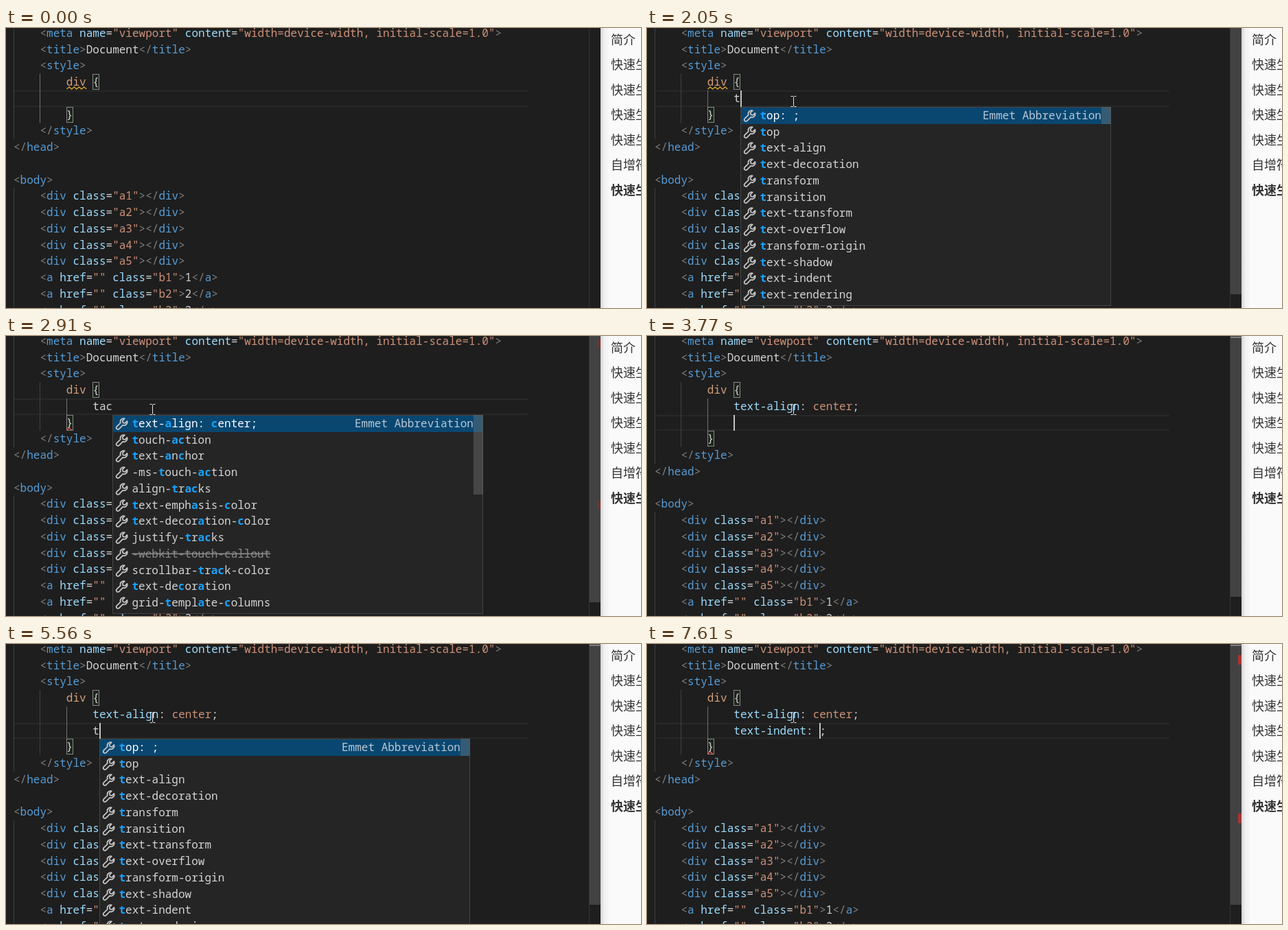
Write an HTML page that moves like this. It is 925 px wide and 408 px high and loops after 8000 ms.

```html
<!DOCTYPE html>
<html lang="en">
<head>
<meta charset="utf-8">
<title>Editor typing</title>
<style>
  html, body { margin: 0; width: 100%; height: 100%; overflow: hidden; background: #1e1e1e; }
  svg { display: block; width: 100%; height: 100%; }
  text { white-space: pre; }
  .code text { font: 16.035px "Noto Sans Mono", monospace; }
  .code .list text { font-weight: 500; }
  .page text { font: 18px "Noto Sans CJK SC", "Noto Sans CJK", sans-serif; fill: #333; }
  .page .current { font-weight: 700; }
  .hit { font-weight: 700; fill: #18a3ff; }
  .old { fill: #8c8c8c; text-decoration: line-through; }
  .slider { fill: #797979; fill-opacity: .4; }
</style>
</head>
<body>
<svg viewBox="0 0 925 408" preserveAspectRatio="none">
  <defs>
    <linearGradient id="edge">
      <stop offset="0" stop-color="#d2d2d2"/>
      <stop offset=".35" stop-color="#efefef"/>
      <stop offset="1" stop-color="#fafafa"/>
    </linearGradient>
    <path id="wrench" d="M14.5 4.5 11.9 7.1 9.5 6.5 8.9 4.1 11.5 1.5A4 4 0 0 0 6.5 6.7L1.8 11.4A2 2 0 0 0 4.6 14.2L9.3 9.5A4 4 0 0 0 14.5 4.5Z"
      fill="none" stroke="#c5c5c5" stroke-width="1.45" stroke-linejoin="round"/>
  </defs>
  <rect width="925" height="408" fill="#1e1e1e"/>
  <g class="code" id="scene"></g>
  <g class="page" id="page">
    <rect x="866" width="59" height="408" fill="#fafafa"/>
    <rect x="866" width="14" height="408" fill="url(#edge)"/>
  </g>
  <path id="pointer" d="M-4-8h3l1 1 1-1h3M0-7V6M-4 7h3l1-1 1 1h3" fill="none" stroke="#e4e4e4"/>
</svg>
<script>
const LOOP = 8000, CHAR = 9.62, LINE = 23.75;
const scene = document.getElementById('scene');
const pointer = document.getElementById('pointer');
const svg = document.querySelector('svg');

const C = { punct: '#808080', tag: '#569cd6', attr: '#9cdcfe', string: '#ce9178', plain: '#d4d4d4', selector: '#d49f7a' };
const colX = col => 11 + col * CHAR;
const pixelX = col => Math.round(colX(col));
const rowY = row => Math.round(-4.1 + row * LINE);

const head = [
  '    <meta name="viewport" content="width=device-width, initial-scale=1.0">',
  '    <title>Document</title>',
  '    <style>'
];
const tail = ['    </style>', '</head>', '', '<body>'];
for (let i = 1; i <= 5; i++) tail.push(`    <div class="a${i}"></div>`);
for (let i = 1; i <= 3; i++) tail.push(`    <a href="" class="b${i}">${i}</a>`);

// Matched letters stand between bars; a leading ~ marks a deprecated entry.
const lists = {
  t: { bar: 25, items: ['|t|op: ;', '|t|op', '|t|ext-align', '|t|ext-decoration', '|t|ransform', '|t|ransition',
    '|t|ext-transform', '|t|ext-overflow', '|t|ransform-origin', '|t|ext-shadow', '|t|ext-indent', '|t|ext-rendering'] },
  ta: { bar: 40, items: ['|t|ext-|a|lign: left;', '|ta|b-size', '|ta|ble-layout', '|t|ext-|a|lign', '|t|ext-|a|lign-last',
    '|t|ext-|a|nchor', '|t|ouch-|a|ction', '|t|r|a|nsform', '|t|r|a|nsition', '|t|r|a|nsform-origin',
    '|t|r|a|nsform-style', '|t|r|a|nsition-delay'] },
  tac: { bar: 116, items: ['|t|ext-|a|lign: |c|enter;', '|t|ouch-|ac|tion', '|t|ext-|a|n|c|hor', '-ms-|t|ouch-|ac|tion',
    'align-|t|r|ac|ks', '|t|ext-emph|a|sis-|c|olor', '|t|ext-decor|a|tion-|c|olor', 'justify-|t|r|ac|ks',
    '~-webkit-touch-callout', 'scrollbar-|t|r|ac|k-color', '|t|ext-de|c|or|a|tion', 'grid-|t|empl|a|te-|c|olumns'] },
  ti: { bar: 25, items: ['|t|ext-|i|ndent: ;', '|t|ext-|i|ndent', '|t|rans|i|tion', '|t|rans|i|tion-delay',
    '|t|rans|i|tion-duration', '|t|rans|i|tion-property', '|t|rans|i|tion-timing-function', '|t|ransform-or|i|gin',
    '|t|ext-al|i|gn', '|t|ext-decorat|i|on', '|t|ext-render|i|ng', '|t|ext-al|i|gn-last'] }
};

const align = 'text-align: center;';
const steps = [
  [0, { css: [''], caret: 0, back: 0, list: '', empty: 1, error: 0 }],
  [660, { caret: 1 }], [1190, { caret: 0 }], [1720, { caret: 1 }],
  [1920, { css: ['t'] }],
  [2050, { list: 't' }],
  [2110, { css: ['ta'] }],
  [2240, { list: 'ta' }],
  [2440, { css: ['tac'], list: 'tac' }],
  [2910, { caret: 0, empty: 0, error: 1 }],
  [3110, { css: [align], caret: 1, list: '' }],
  [3570, { caret: 0, error: 0 }],
  [3770, { css: [align, ''], caret: 1 }],
  [4310, { caret: 0 }], [4770, { caret: 1 }], [5300, { caret: 0 }],
  [5430, { css: [align, 't'], caret: 1 }],
  [5560, { list: 't' }],
  [5830, { css: [align, 'ti'], list: 'ti' }],
  [6300, { caret: 0 }], [6360, { error: 1 }], [6820, { caret: 1 }], [7340, { caret: 0 }],
  [7540, { css: [align, 'text-indent: ;'], back: 1, list: '' }],
  [7610, { caret: 1 }]
];

const esc = s => s.replace(/&/g, '&amp;').replace(/</g, '&lt;');
const rect = (x, y, w, h, fill, extra = '') => `<rect x="${x}" y="${y}" width="${w}" height="${h}" fill="${fill}" ${extra}/>`;
const text = (x, y, body, fill = C.plain) => `<text x="${x}" y="${y}" fill="${fill}">${body}</text>`;
const span = (s, fill) => `<tspan fill="${fill}">${esc(s)}</tspan>`;
const guide = (col, from, to, fill = '#404040') => rect(pixelX(col), rowY(from), 1, rowY(to) - rowY(from), fill);

function markup(line) {
  const token = /(<\/?|>)|((?<=<\/?)\w+)|(\w+(?=="))|("[^"]*")|(\w+|[^<>"\w]+)/g;
  const fills = [C.punct, C.tag, C.attr, C.string, C.plain];
  return [...line.matchAll(token)]
    .map(m => span(m[0], fills[m.slice(1).findIndex(g => g !== undefined)])).join('');
}

function declaration(line) {
  const m = line.match(/^([\w-]+)(: )(\w*)(;)$/);
  const fills = [C.attr, C.plain, C.string, C.plain];
  return m ? m.slice(1).map((s, i) => span(s, fills[i])).join('') : span(line, C.plain);
}

function squiggle(x, y, width, stroke) {
  let d = `M${x} ${y + 3}`;
  for (let i = 1; i * 3.6 <= width; i++) d += `L${x + i * 3.6} ${y + (i % 2 ? 0 : 3)}`;
  return `<path d="${d}" fill="none" stroke="${stroke}" stroke-width="1.4"/>`;
}

function bracketBox(col, row) {
  return rect(pixelX(col) + .5, rowY(row) + .5, 9, 22, '#1c251c', 'stroke="#888"');
}

function popup({ items, bar }, x, y) {
  const w = 539, h = 289;
  let out = rect(x, y + .5, w, h, '#252526', 'stroke="#454545"') + rect(x + .5, y + 1, w - 1, 24, '#094771');
  items.forEach((item, i) => {
    const top = Math.round(y + .9 + i * LINE), old = item[0] === '~';
    const label = old ? `<tspan class="old">${item.slice(1)}</tspan>`
      : item.split('|').map((s, k) => k % 2 ? `<tspan class="hit">${s}</tspan>` : s).join('');
    out += `<use href="#wrench" transform="translate(${x + 3.5} ${top + 2.5}) scale(1.2)"/>`
      + text(x + 28, top + 17, label, i ? C.plain : '#fff');
  });
  out += text(x + 352.5, y + 18, 'Emmet Abbreviation', '#b9c8d5')
    + `<rect class="slider" x="${x + w - 13.5}" y="${y}" width="14" height="${bar}" style="opacity:var(--list-bar)"/>`;
  return `<g class="list">${out}</g>`;
}

function draw({ css, caret, back, list, empty, error }) {
  const row = 3 + css.length, close = row + 1;
  const line = css[css.length - 1];
  const x = pixelX(12 + line.length - back), grown = css.length > 1;
  let out = '';

  out += rect(11, rowY(row), 750, 2, '#282828') + rect(11, rowY(row + 1) - 2, 750, 2, '#282828');
  out += guide(0, 0, close + 2) + guide(0, close + 5, 20);
  out += guide(4, 3, close + 1, css[0] ? '#404040' : '#707070');
  if (css[0]) out += guide(8, 4, close, '#707070');
  out += bracketBox(12, 3) + bracketBox(8, close);

  const lines = [
    ...head.map(markup),
    span('        div', C.selector) + span(' {', C.plain),
    ...css.map(s => ' '.repeat(12) + declaration(s)),
    span('        }', C.plain),
    ...tail.map(markup)
  ];
  lines.forEach((body, i) => { out += text(colX(0), rowY(i) + 17, body); });

  if (empty) out += squiggle(colX(8) + .5, rowY(3) + 19, 29, '#d8a032');
  if (error) out += squiggle(colX(8) + .5, rowY(close) + 19, 9, '#f14c4c');
  if (caret) out += rect(x, rowY(row), 2, rowY(row + 1) - rowY(row), '#c4c4c2');

  out += rect(849, 0, 1, 408, '#363636');
  out += `<rect class="slider" x="850" width="16" height="${grown ? 380 : 388}" style="opacity:var(--bar)"/>`;
  if (grown) out += rect(850, 1, 16, 2, '#7c7c7c');
  if (error) {
    const fill = grown ? '#a83434' : '#6b3535';
    out += rect(861, grown ? 16 : 4, 5, 14, fill) + rect(861, grown ? 247 : 239, 5, 14, fill);
  }
  if (list) out += popup(lists[list], x + .5, rowY(row + 1));
  scene.innerHTML = out;
}

const ramp = (t, a, b) => Math.min(1, Math.max(0, (t - a) / (b - a)));

function movePointer(t) {
  const p = ramp(Math.floor((t - 70) / 65), 0, 12);
  const e = p * p * (3 - 2 * p);
  const [x, y] = t < 920 ? [860 - 650 * e, 380 - 277 * e] : [213, 107];
  pointer.setAttribute('transform', `translate(${Math.round(x) + .5} ${Math.round(y) + .5})`);
  pointer.setAttribute('visibility', t < 70 ? 'hidden' : 'visible');
}

['简介', '快速生成', '快速生成', '快速生成', '快速生成', '自增符号', '快速生成'].forEach((title, i, all) => {
  const current = i === all.length - 1 ? 'class="current"' : '';
  document.getElementById('page').innerHTML += `<text x="881" y="${23.5 + i * 36.5}" ${current}>${title}</text>`;
});

const start = performance.now();
let shown = -1;

function frame() {
  const t = (performance.now() - start) % LOOP;
  const count = steps.filter(([at]) => at <= t).length;
  if (count !== shown) {
    shown = count;
    draw(Object.assign({}, ...steps.slice(0, count).map(s => s[1])));
  }
  svg.style.setProperty('--bar', ramp(t, 70, 200));
  svg.style.setProperty('--list-bar', 1 - ramp(t, 6640, 6820));
  movePointer(t);
  requestAnimationFrame(frame);
}
frame();
</script>
</body>
</html>
```
